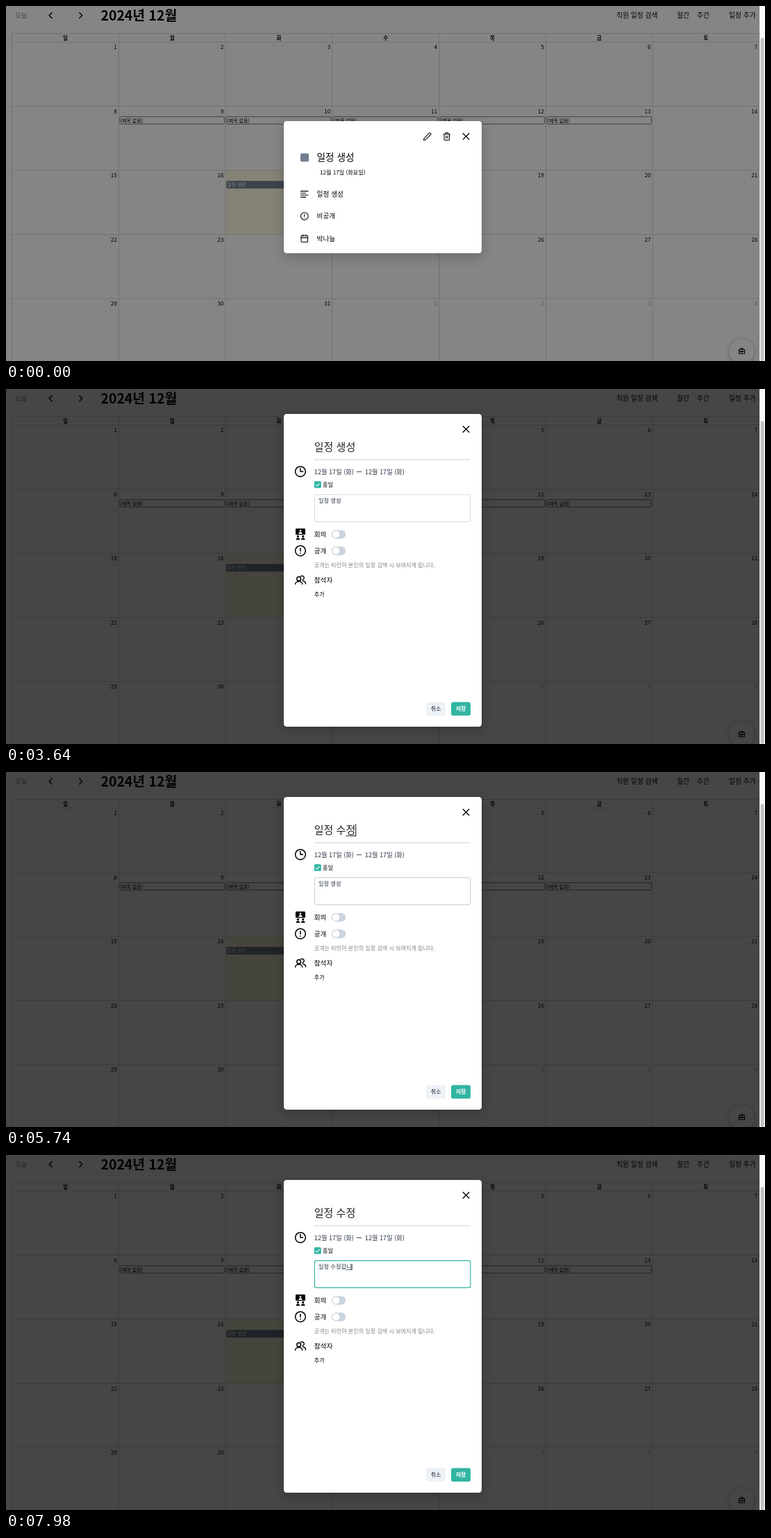
An HTML page that plays this animation: 1093 px wide and 512 px high, repeating every 8000 ms.

```html
<!DOCTYPE html>
<html lang="ko">
<head>
<meta charset="utf-8">
<title>일정</title>
<style>
  html, body { margin: 0; width: 100%; height: 100%; overflow: hidden; background: #fff; }
  svg { display: block; width: 100vw; height: 100vh; }
  text { font-family: "Noto Sans CJK KR", "Noto Sans CJK", "Noto Sans", sans-serif; white-space: pre; }
  .line { fill: none; stroke: #000; stroke-linecap: round; stroke-linejoin: round; }
  .box { fill: #fff; filter: drop-shadow(0 5px 8px rgba(0, 0, 0, .22)); }
</style>
</head>
<body>
<svg id="stage" viewBox="0 0 1093 512" preserveAspectRatio="none">
  <g id="page"></g>
  <rect width="1085" height="512" opacity=".48"/>
  <g id="detail"></g>
  <g id="form">
    <rect width="1085" height="512" opacity=".48"/>
  </g>
  <g id="bar">
    <rect x="1085" width="8" height="512" fill="#fafafa"/>
    <rect x="1085" width="1" height="512" fill="#ececec"/>
    <rect x="1086.6" y="46" width="5" height="466" rx="2.5" fill="#c1c1c1"/>
  </g>
</svg>
<script>
const NS = 'http://www.w3.org/2000/svg';
const LOOP = 8000;
const TEAL = '#31b5a2', SLATE = '#708090', INK = '#2d3748';
const get = id => document.getElementById(id);
const page = get('page'), detail = get('detail'), form = get('form');

function add(parent, tag, attrs) {
  const el = document.createElementNS(NS, tag);
  for (const key in attrs) el.setAttribute(key, attrs[key]);
  parent.append(el);
  return el;
}
const rect = (parent, x, y, width, height, fill, more) =>
  add(parent, 'rect', { x, y, width, height, fill, ...more });

// cy is the middle of the Korean glyphs
function label(parent, x, cy, size, str, more) {
  const el = add(parent, 'text', { x, y: cy + size * .38, 'font-size': size, ...more });
  el.textContent = str;
  return el;
}
function icon(parent, x, y, scale, d, width = 2) {
  return add(parent, 'path', {
    class: 'line', d, 'stroke-width': width, transform: `translate(${x} ${y}) scale(${scale})`
  });
}
const ring = (cx, cy, r) => `M${cx - r} ${cy}a${r} ${r} 0 1 0 ${2 * r} 0a${r} ${r} 0 1 0 ${-2 * r} 0`;
const CROSS = 'M4 4L20 20M20 4L4 20';
const ALERT = ring(12, 12, 10) + 'M12 7v6M12 16.6v.2';

function drawPage() {
  const left = 8.5, top = 52, colW = 153.75, rowH = 92.5;
  const colX = i => left + i * colW, rowY = i => top + i * rowH;

  rect(page, 0, 0, 1085, 512, '#fff');
  label(page, 13, 13.5, 9.5, '오늘', { fill: '#808080' });
  icon(page, 57.5, 6.5, .58, 'M15 19l-7-7 7-7', 2.4);
  icon(page, 100.5, 6.5, .58, 'M9 5l7 7-7 7', 2.4);
  label(page, 136.5, 13.5, 19.4, '2024년 12월', { 'font-weight': 700 });
  label(page, 879, 13, 9.8, '직원 일정 검색');
  label(page, 966, 13, 9.8, '월간');
  label(page, 995, 13, 9.8, '주간');
  label(page, 1041, 13, 9.8, '일정 추가');

  rect(page, colX(2), rowY(2), colW, rowH, '#fffadf');
  let grid = `M${left} 39.5H1085`;
  for (let r = 0; r < 5; r++) grid += `M${left} ${rowY(r)}H1085`;
  for (let c = 0; c < 8; c++) grid += `M${colX(c)} 39V512`;
  add(page, 'path', { d: grid, fill: 'none', stroke: '#d8d8d8', 'stroke-width': 1 });

  [...'일월화수목금토'].forEach((day, c) =>
    label(page, colX(c + .5), 45.7, 7.6, day, { 'text-anchor': 'middle', 'font-weight': 700 }));

  for (let i = 0; i < 35; i++) {
    const c = i % 7, r = Math.floor(i / 7);
    label(page, colX(c + 1) - 2.4, rowY(r) + 7.2, 8.2, i < 31 ? i + 1 : i - 30,
      { 'text-anchor': 'end', opacity: i < 31 ? 1 : .35 });
  }
  for (let c = 1; c < 6; c++) {
    rect(page, colX(c) + 1.6, 159.7, 150.6, 10.6, '#fff', { rx: 1.6, stroke: SLATE });
    label(page, colX(c) + 2.4, 165, 7, '(제목 없음)');
  }
  rect(page, colX(2) + 1.4, 252.2, 151, 11, SLATE, { rx: 1.6 });
  label(page, colX(2) + 2.6, 257.8, 6.8, '일정 생성', { fill: '#fff' });

  add(page, 'circle', {
    cx: 1059.5, cy: 498, r: 18, fill: '#fff', style: 'filter:drop-shadow(0 1px 3px rgba(0,0,0,.3))'
  });
  icon(page, 1053.5, 491.5, .5,
    'M4 8h16v12H4zM8.5 8V4.5h7V8M4 13.5h16M10 12v3.5h4V12', 2.2);
}

function drawDetail() {
  rect(detail, 400, 166, 285, 190.6, '#fff', { rx: 4.2, class: 'box' });
  icon(detail, 600.4, 181.8, .53,
    'M17 3a2.828 2.828 0 1 1 4 4L7.5 20.5 2 22l1.5-5.5L17 3z');
  icon(detail, 628.4, 181.8, .53,
    'M3 6h18M19 6v14a2 2 0 0 1-2 2H7a2 2 0 0 1-2-2V6m3 0V4a2 2 0 0 1 2-2h4a2 2 0 0 1 2 2v2M10 11v6M14 11v6');
  icon(detail, 656, 181.6, .54, CROSS, 2.4);
  rect(detail, 424, 212.6, 12, 12, SLATE, { rx: 2 });
  label(detail, 447.6, 218, 13.6, '일정 생성');
  label(detail, 452, 240.2, 8.15, '12월 17일 (화요일)');
  icon(detail, 423.4, 265, .53, 'M2 4h20M2 9.3h14M2 14.6h20M2 20h14');
  icon(detail, 423.4, 296.6, .54, ALERT);
  icon(detail, 423.4, 328.8, .53,
    'M5 4h14a2 2 0 0 1 2 2v14a2 2 0 0 1-2 2H5a2 2 0 0 1-2-2V6a2 2 0 0 1 2-2zM16 2v4M8 2v4M3 10h18');
  label(detail, 447.6, 271, 9.7, '일정 생성');
  label(detail, 447.6, 302.8, 9.6, '비공개');
  label(detail, 447.6, 335, 9.6, '박나늘');
}

function drawForm() {
  rect(form, 400, 36, 285, 451, '#fff', { rx: 4.2, class: 'box' });
  icon(form, 656, 51.5, .54, CROSS, 2.5);
  rect(form, 444, 101.5, 225, 1, '#cdcfd3');

  icon(form, 414.6, 109.7, .78, ring(12, 12, 9.4) + 'M12 6.2V12h4.6');
  label(form, 443.8, 119.2, 9.2, '12월 17일 (화)', { fill: INK });
  rect(form, 505, 118.8, 7, 1, INK);
  label(form, 516.8, 119.2, 9.2, '12월 17일 (화)', { fill: INK });

  rect(form, 444, 133, 9.8, 9.8, TEAL, { rx: 1.6 });
  add(form, 'path', {
    d: 'M446.3 138.2l1.8 1.8 3.6-4.1', fill: 'none', stroke: '#fff', 'stroke-width': 1.1
  });
  label(form, 456, 138, 8.1, '종일');

  // Meeting screen with two listeners
  rect(form, 417, 201.3, 14, 9, '#000', { rx: 1.2 });
  add(form, 'path', { d: ring(424, 204.4, 1.4) + 'M421.4 208.9q0-2.6 2.6-2.6t2.6 2.6z', fill: '#fff' });
  for (const x of [420.4, 427.8])
    add(form, 'path', { d: ring(x, 212.7, 1.6) + `M${x - 2.8} 217.4q0-2.7 2.8-2.7t2.8 2.7z` });

  icon(form, 414.6, 224, .78, ring(12, 12, 9.4) + 'M12 7.5v5M12 16v.2');
  icon(form, 415.2, 266.8, .72,
    ring(9, 9.5, 4) + 'M2 20.5c0-7.5 14-7.5 14 0M13 4.5a4 4 0 1 1 3.5 7M17 13.8c3.5.4 5.6 2.6 5.6 6', 2);

  [['회의', 209.7], ['공개', 233.5]].forEach(([name, y]) => {
    label(form, 443.8, y - .3, 9.6, name);
    rect(form, 469, y - 6.2, 20.2, 12.4, '#cbd5e0', { rx: 6.2 });
    add(form, 'circle', { cx: 475.3, cy: y, r: 5, fill: '#fff' });
  });
  label(form, 443.8, 254.3, 8.07, '공개는 타인이 본인의 일정 검색 시 보여지게 됩니다.', { fill: '#858585' });
  label(form, 443.8, 275.2, 9.6, '참석자');
  label(form, 443.8, 296.4, 8.1, '추가');

  rect(form, 605, 451.5, 28, 19.6, '#edf2f7', { rx: 3.2 });
  label(form, 619, 461.4, 8, '취소', { 'text-anchor': 'middle', fill: '#1a202c', 'font-weight': 500 });
  rect(form, 641, 451.5, 28, 19.6, TEAL, { rx: 3.2 });
  label(form, 655, 461.4, 8, '저장', { 'text-anchor': 'middle', fill: '#fff', 'font-weight': 700 });
}

// Text input with a composing underline and a caret
function field(x, cy, size, lineY, lineH, caretY, caretH, fill) {
  const text = label(form, x, cy, size, '', { fill });
  const under = rect(form, 0, lineY, 0, lineH, fill);
  const caret = rect(form, 0, caretY, 1, caretH, '#111');
  return (done, comp, on) => {
    text.textContent = done + comp;
    const end = x + text.getComputedTextLength();
    const from = comp ? x + text.getSubStringLength(0, done.length) : end;
    under.setAttribute('x', from);
    under.setAttribute('width', end - from);
    caret.setAttribute('x', end);
    caret.setAttribute('opacity', on ? 1 : 0);
  };
}

drawPage();
drawDetail();
drawForm();
const area = rect(form, 444.4, 152.4, 224.4, 39, '#fff', { rx: 2.6 });
const setTitle = field(443.8, 83.6, 15, 91.6, 1, 75, 18, '#222');
const setNote = field(450, 161.3, 8.2, 165.1, .8, 157, 9, INK);

const REST = '#d3dae3', HOVER = '#c4ccd6';
const title = (done, comp, on) => ({ title: ['일정 ' + done, comp, on] });
const note = (done, comp, on) => ({ note: ['일정 ' + done, comp, on] });

const steps = [
  [0, { open: false, border: HOVER, ...title('생성', '', false), ...note('생성', '', false) }],
  [2310, { open: true }],
  [2870, { border: REST }],
  [3150, title('생성', '', true)],
  [3640, title('생성', '', false)],
  [3780, title('생', '', false)],
  [3920, title('', '', false)],
  [4200, title('', '', true)],
  [4340, title('', 'ㅅ', true)],
  [4410, title('', '수', true)],
  [4480, title('', '숮', true)],
  [4550, title('수', '저', true)],
  [4690, title('수', '정', true)],
  [5180, title('수', '정', false)],
  [5600, { border: HOVER }],
  [5740, title('수', '정', true)],
  [5880, { border: TEAL, ...title('수정', '', false), ...note('생성', '', true) }],
  [6370, note('생성', '', false)],
  [6510, note('생', '', false)],
  [6650, note('', '', false)],
  [6930, note('', '', true)],
  [7140, note('', 'ㅅ', true)],
  [7210, note('', '수', true)],
  [7280, note('', '숮', true)],
  [7350, note('수', '저', true)],
  [7420, note('수', '정', true)],
  [7560, note('수정', 'ㅎ', true)],
  [7630, note('수정', '하', true)],
  [7700, note('수정', '합', true)],
  [7910, note('수정합', 'ㄴ', true)],
  [7980, note('수정합', '니', true)]
];

let shown = -1;
function show(t) {
  const index = steps.filter(s => s[0] <= t).length;
  if (index === shown) return;
  shown = index;
  const state = Object.assign({}, ...steps.slice(0, index).map(s => s[1]));
  detail.style.display = state.open ? 'none' : '';
  form.style.display = state.open ? '' : 'none';
  area.setAttribute('stroke', state.border);
  area.setAttribute('stroke-width', state.border === TEAL ? 1.2 : 1);
  if (state.open) {
    setTitle(...state.title);
    setNote(...state.note);
  }
}

const start = performance.now();
function tick() {
  show((performance.now() - start) % LOOP);
  requestAnimationFrame(tick);
}
tick();
</script>
</body>
</html>
```
